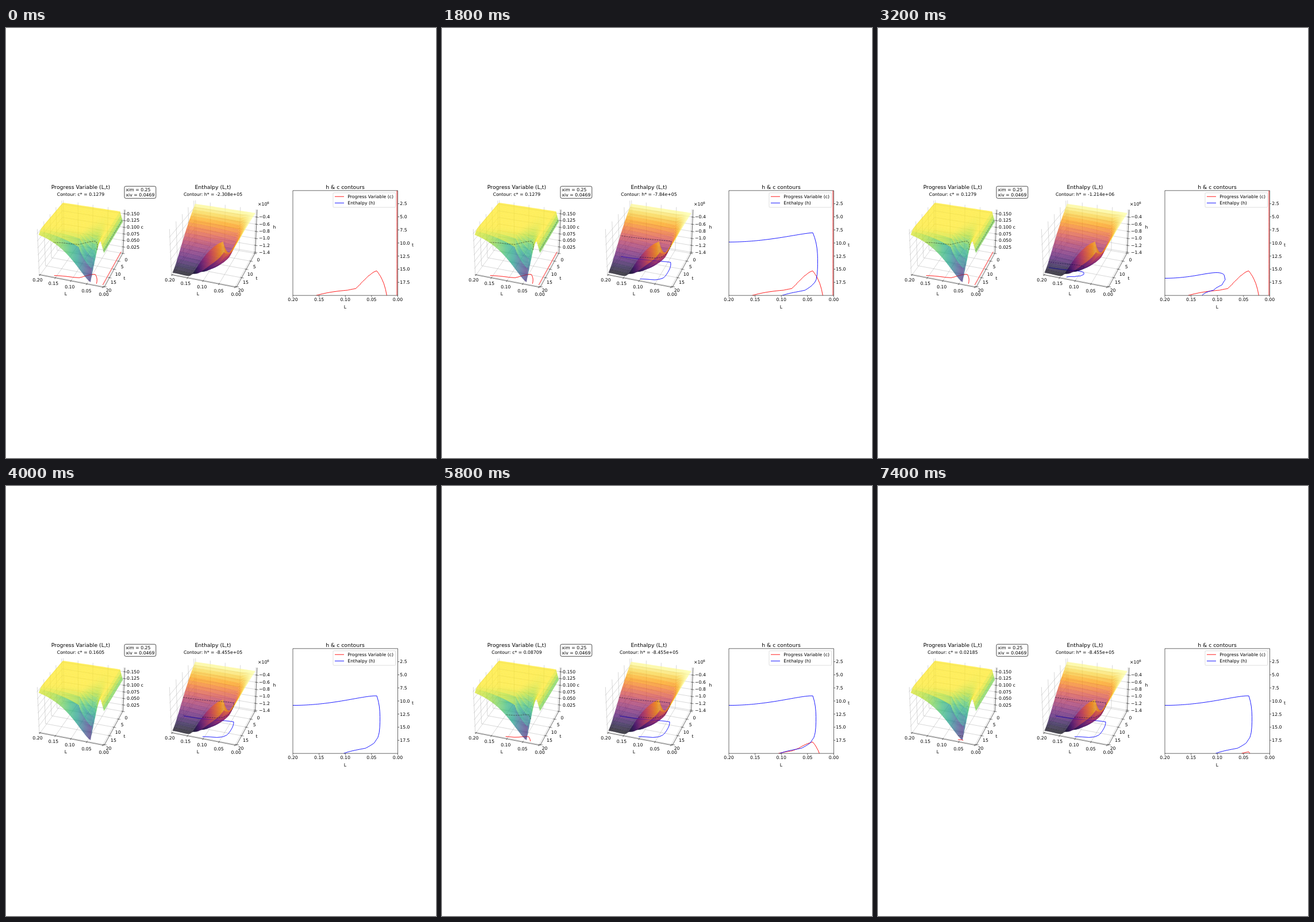
An HTML page with a canvas for the animation above (7.6 s loop, 748 px wide and 748 px high).

```html
<!DOCTYPE html>
<html lang="en">
<head>
<meta charset="utf-8">
<title>Contour sweep</title>
<style>
  html, body { margin: 0; width: 100%; height: 100%; overflow: hidden; background: #fff; }
  canvas, svg { position: absolute; left: 0; top: 0; width: 748px; height: 748px; }
  text { font-family: "DejaVu Sans", sans-serif; font-size: 7.75px; fill: #000; }
  .title { font-size: 9.3px; }
</style>
</head>
<body>
<canvas id="stage" width="748" height="748"></canvas>
<svg id="labels" viewBox="0 0 748 748"></svg>
<script>
const SIZE = 748, STEP_MS = 200, SWEEP = 19;
const L_MAX = .2, T_MAX = 20, L_CELLS = 60, T_CELLS = 20;
const RIDGE = .04;
const VIRIDIS = "440154 482878 3e4989 31688e 26828e 1f9e89 35b779 6ece58 b5de2b fde725";
const INFERNO = "000004 1b0c41 4a0c6b 781c6d a52c60 cf4446 ed6925 fb9b06 f7d13d fcffa4";

// A flat plateau with a dip that deepens exponentially towards the last t.
function progress(L, t) {
  const x = L - RIDGE, right = Math.max(0, x);
  const depth = .149 * (x < 0 ? Math.max(0, 1 + x / .0238) : Math.exp(-((x / .0815) ** 1.35)));
  const decay = 1 + 1.9 * Math.max(0, 1 - (right / .04) ** 1.6);
  const edge = .036 * Math.max(0, 1 - L / .01);
  return .158 - depth * Math.exp((t - T_MAX) / decay) - edge;
}

// Steady cooling, blended with a late reheating around the ridge.
function enthalpy(L, t) {
  const x = L - RIDGE, right = Math.max(0, x);
  const s = t * (1 + .25 * ((L_MAX - Math.max(L, RIDGE)) / .16) ** 2);
  const cooled = 2.8 + .43 * s + .0085 * s * s - .03 * Math.max(0, s - 14) ** 2;
  const final = 2.9 + (x < 0 ? -300 * x : 45 * x + 680 * x * x);
  const rise = Math.max(0, 9.9 + 65 * right - final);
  const decay = 1 + .7 * Math.exp(-right / .01);
  const heated = final + rise * (1 - Math.exp((t - T_MAX) / decay));
  const blend = -Math.log(Math.exp(-cooled) + Math.exp(-heated));
  return -1e5 * (2.8 + (blend - 2.8) * Math.min(1, L / RIDGE) ** 1.2);
}

const plots = [
  { cx: 132.6, field: progress, lo: .0022, hi: .165, map: VIRIDIS, ink: "#f00",
    dash: "rgba(40,40,20,.75)", firstTick: .025, tickStep: .025 },
  { cx: 362.6, field: enthalpy, lo: -1.416e6, hi: -.197e6, map: INFERNO, ink: "#00f",
    dash: "rgba(25,10,70,.85)", firstTick: -1.4e6, tickStep: .2e6 }
];

const ctx = document.getElementById("stage").getContext("2d");
const svg = document.getElementById("labels");

function label(text, x, y, anchor = "middle", cls = "") {
  const node = document.createElementNS(svg.namespaceURI, "text");
  node.setAttribute("x", x);
  node.setAttribute("y", y + (cls ? 3.3 : 2.8));
  node.setAttribute("text-anchor", anchor);
  node.setAttribute("class", cls);
  node.textContent = text;
  svg.append(node);
  return node;
}

function newLayer() {
  const canvas = document.createElement("canvas");
  canvas.width = canvas.height = SIZE;
  return canvas.getContext("2d");
}

function stroke(c, points, color, width, dash = []) {
  c.beginPath();
  points.forEach(([x, y]) => c.lineTo(x, y));
  c.strokeStyle = color;
  c.lineWidth = width;
  c.lineJoin = "round";
  c.setLineDash(dash);
  c.stroke();
  c.setLineDash([]);
}

// Perspective camera: u, v, w run 0..1 inside the axes box.
const AZIM = -71 * Math.PI / 180, ELEV = Math.PI / 6;
function project(plot, u, v, w) {
  const x = (u - .5) * 1.1905, y = (v - .5) * 1.1905, z = (w - .5) * .8929;
  const ca = Math.cos(AZIM), sa = Math.sin(AZIM), ce = Math.cos(ELEV), se = Math.sin(ELEV);
  const away = x * ca + y * sa;
  const scale = 99 / (1 - (ce * away + z * se) / 10);
  return [plot.cx + scale * (y * ca - x * sa), 372 - scale * (z * ce - se * away)];
}
const inset = f => .02 + .96 * f;
const height = (plot, value) => (value - plot.lo) / (plot.hi - plot.lo);
const place = (plot, L, t, value) =>
  project(plot, inset(1 - L / L_MAX), inset(1 - t / T_MAX), height(plot, value));
const flat = ([L, t]) => [681.5 - L * 912.5, 282.8 + t * 9.12];
const nodeL = i => i / L_CELLS * L_MAX;
const nodeT = j => j / T_CELLS * T_MAX;

function shade(map, f) {
  const stops = map.split(" "), p = Math.max(0, Math.min(.9999, f)) * (stops.length - 1);
  const k = Math.floor(p);
  const channel = (s, n) => parseInt(s.substr(n * 2, 2), 16);
  const mix = n => Math.round(channel(stops[k], n) * (1 - p + k) + channel(stops[k + 1], n) * (p - k));
  return `rgb(${mix(0)},${mix(1)},${mix(2)})`;
}

// Marching squares with the segments linked into polylines.
function contour(grid, level) {
  const points = new Map(), links = new Map();
  const cross = (i, j, di, dj) => {
    const a = grid[i][j], b = grid[i + di][j + dj];
    if ((a < level) === (b < level)) return null;
    const f = (level - a) / (b - a), key = `${i},${j},${di}`;
    points.set(key, [nodeL(i + f * di), nodeT(j + f * dj)]);
    return key;
  };
  const link = (a, b) => links.set(a, [...(links.get(a) || []), b]);
  for (let i = 0; i < L_CELLS; i++) for (let j = 0; j < T_CELLS; j++) {
    const keys = [cross(i, j, 1, 0), cross(i + 1, j, 0, 1), cross(i, j + 1, 1, 0), cross(i, j, 0, 1)]
      .filter(Boolean);
    for (let k = 0; k + 1 < keys.length; k += 2) {
      link(keys[k], keys[k + 1]);
      link(keys[k + 1], keys[k]);
    }
  }
  const seen = new Set(), lines = [];
  const starts = [...links.keys()].sort((a, b) => links.get(a).length - links.get(b).length);
  for (const start of starts) {
    const line = [];
    for (let key = start; key && !seen.has(key); key = links.get(key).find(k => !seen.has(k))) {
      seen.add(key);
      line.push(points.get(key));
    }
    if (line.length > 1) lines.push(line);
  }
  return lines;
}

function drawBox(c, plot) {
  const line = (points, color = "#b0b0b0", width = .5) =>
    stroke(c, points.map(p => project(plot, ...p)), color, width);
  for (let k = 0; k < 5; k++) {
    const f = inset(k / 4);
    line([[f, 0, 0], [f, 1, 0], [f, 1, 1]]);
    line([[1, f, 0], [0, f, 0], [0, f, 1]]);
    line([[f, .02, 0], [f, -.03, 0]], "#000");
    line([[.98, f, 0], [1.03, f, 0]], "#000");
  }
  for (let k = 0; k < 6; k++) {
    const w = height(plot, plot.firstTick + k * plot.tickStep);
    line([[0, 0, w], [0, 1, w], [1, 1, w]]);
    line([[.98, 1, w], [1.03, 1, w]], "#000");
  }
  line([[0, 0, 0], [1, 0, 0], [1, 1, 0], [1, 1, 1]], "#000", .6);
}

function drawSurface(c, plot) {
  const g = plot.grid, values = g.flat();
  const min = Math.min(...values), max = Math.max(...values);
  const corner = ([i, j]) => place(plot, nodeL(i), nodeT(j), g[i][j]);
  c.globalAlpha = .72;
  for (let j = 0; j < T_CELLS; j++) for (let i = L_CELLS - 1; i >= 0; i--) {
    const quad = [[i, j], [i + 1, j], [i + 1, j + 1], [i, j + 1]];
    const mean = quad.reduce((sum, [a, b]) => sum + g[a][b], 0) / 4;
    c.beginPath();
    quad.forEach(p => c.lineTo(...corner(p)));
    c.closePath();
    c.fillStyle = c.strokeStyle = shade(plot.map, (mean - min) / (max - min));
    c.lineWidth = .2;
    c.fill();
    c.stroke();
  }
}

const boxes = newLayer();
for (const plot of plots) {
  plot.grid = Array.from({ length: L_CELLS + 1 }, (_, i) =>
    Array.from({ length: T_CELLS + 1 }, (_, j) => plot.field(nodeL(i), nodeT(j))));
  plot.floor = plot.lo + .03 * (plot.hi - plot.lo);
  plot.layer = newLayer();
  drawBox(boxes, plot);
  drawSurface(plot.layer, plot);
}

function drawPlot(plot, lines) {
  const floor = lines.map(line => line.map(([L, t]) => place(plot, L, t, plot.floor)));
  floor.forEach(line => stroke(ctx, line, plot.ink, .75));
  ctx.drawImage(plot.layer.canvas, 0, 0);
  ctx.globalAlpha = .35;
  floor.forEach(line => stroke(ctx, line, plot.ink, .75));
  ctx.globalAlpha = 1;
  for (const line of lines) {
    const raised = line.map(([L, t]) => place(plot, L, t, plot.level));
    stroke(ctx, raised, plot.dash, .75, [2.8, 1.3]);
  }
}

function roundBox(x, y, w, h, r, edge, width, fill) {
  ctx.beginPath();
  ctx.roundRect(x, y, w, h, r);
  ctx.fillStyle = fill;
  ctx.fill();
  ctx.strokeStyle = edge;
  ctx.lineWidth = width;
  ctx.stroke();
}

function drawFlat(allLines) {
  ctx.save();
  ctx.beginPath();
  ctx.rect(499, 283, 182.5, 182.2);
  ctx.clip();
  allLines.forEach((lines, k) =>
    lines.forEach(line => stroke(ctx, line.map(flat), plots[k].ink, .9)));
  ctx.restore();
  ctx.strokeStyle = "#000";
  ctx.lineWidth = .6;
  ctx.strokeRect(499, 282.8, 182.5, 182.4);
  for (let k = 0; k < 5; k++) {
    const [x, y] = flat([k * .05, T_MAX]);
    stroke(ctx, [[x, y], [x, y + 2.7]], "#000", .6);
  }
  for (let t = 2.5; t < T_MAX; t += 2.5) {
    const [x, y] = flat([0, t]);
    stroke(ctx, [[x, y], [x + 2.7, y]], "#000", .6);
  }
  roundBox(569, 286.7, 108.7, 25.3, 1.5, "rgba(204,204,204,.8)", .8, "rgba(255,255,255,.8)");
  stroke(ctx, [[572, 293.2], [588, 293.2]], "#f00", .9);
  stroke(ctx, [[572, 304.4], [588, 304.4]], "#00f", .9);
}

function addLabels() {
  label("Progress Variable (L,t)", 130, 276.5, "middle", "title");
  label("Enthalpy (L,t)", 360, 276.5, "middle", "title");
  label("h & c contours", 590, 276.5, "middle", "title");
  label("xim = 0.25", 208.5, 281, "start");
  label("xiv = 0.0469", 208.5, 289.7, "start");
  for (const dx of [0, 230]) {
    for (let k = 0; k < 5; k++) {
      label((L_MAX - k * .05).toFixed(2), 55 + dx + 27 * k + .45 * k * k, 438.4 + 6.1 * k);
      label(k * 5, 209 + dx - 6.6 * k - .25 * k * k, 403.5 + 11.8 * k + .36 * k * k);
    }
    label("L", 104 + dx, 462);
    label("t", 206 + dx, 435);
  }
  for (let k = 0; k < 6; k++) {
    label((.15 - k * .025).toFixed(3), 210, 323 + k * 11.6, "start");
    label("\u2212" + (.4 + k * .2).toFixed(1), 440, 328.5 + k * 12.3, "start");
  }
  label("c", 237, 346.5);
  label("h", 467, 346.5);
  label("\u00d710", 438, 306.5, "start");
  label("6", 454.3, 303, "start").style.fontSize = "5.4px";
  for (let k = 0; k < 5; k++) label((k * .05).toFixed(2), flat([k * .05, 0])[0], 472);
  for (let t = 2.5; t < T_MAX; t += 2.5) label(t.toFixed(1), 685.3, flat([0, t])[1], "start");
  label("L", 590, 485);
  label("t", 707.5, 377);
  label("Progress Variable (c)", 594.3, 293.2, "start");
  label("Enthalpy (h)", 594.3, 304.4, "start");
}

addLabels();
const captions = [label("", 130, 289.5), label("", 360, 289.5)];

function scientific(x) {
  const [mantissa, exponent] = x.toExponential(3).split("e+");
  return `${Number(mantissa)}e+${exponent.padStart(2, "0")}`;
}

function render(step) {
  const sweepingH = step < SWEEP;
  plots[0].level = .16864 - .008155 * (sweepingH ? 5 : step - SWEEP);
  plots[1].level = -230800 - 61470 * (sweepingH ? step : 10);
  captions[0].textContent = `Contour: c* = ${Number(plots[0].level.toPrecision(4))}`;
  captions[1].textContent = `Contour: h* = ${scientific(plots[1].level)}`;

  ctx.fillStyle = "#fff";
  ctx.fillRect(0, 0, SIZE, SIZE);
  ctx.drawImage(boxes.canvas, 0, 0);
  const allLines = plots.map(plot => contour(plot.grid, plot.level));
  plots.forEach((plot, k) => drawPlot(plot, allLines[k]));
  drawFlat(allLines);
  roundBox(206, 275.3, 54.8, 21, 2.5, "#000", .7, "#fff");
}

let shown = -1;
const origin = performance.now();
function tick() {
  const step = Math.floor((performance.now() - origin) / STEP_MS) % (2 * SWEEP);
  if (step !== shown) render(shown = step);
  requestAnimationFrame(tick);
}
tick();
</script>
</body>
</html>
```
